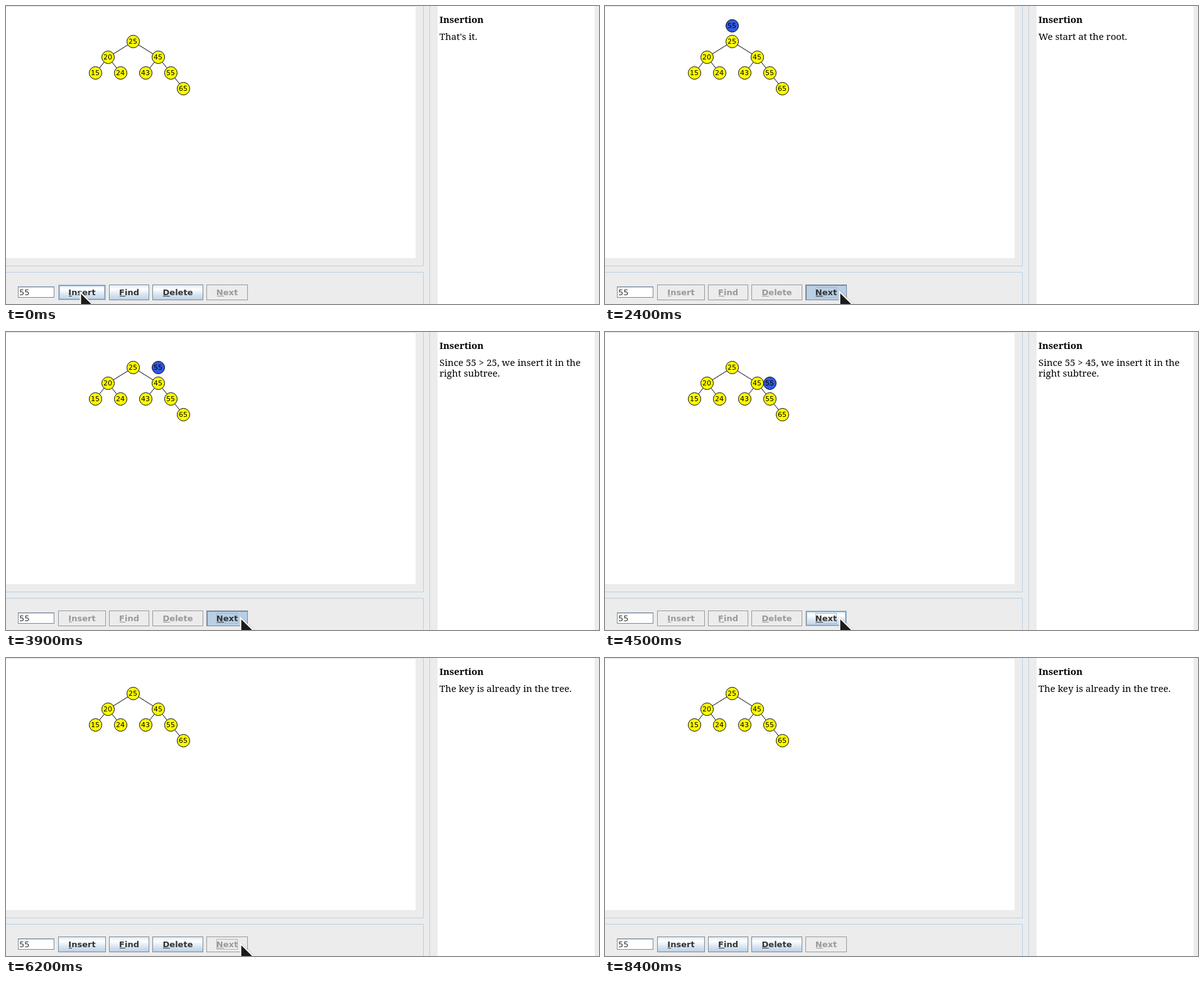
These frames come from a looping animation (944 by 474 pixels, 8600 ms). An HTML page:

```html
<!DOCTYPE html>
<html lang="en">
<head>
<meta charset="utf-8">
<title>Binary search tree insertion</title>
<style>
  html, body { margin: 0; width: 100%; height: 100%; overflow: hidden; background: #ececec; }
  svg { display: block; }
  .pane { fill: none; stroke: #b8cfe5; }
  .links { stroke: #000; }
  .node circle { fill: #ff0; stroke: #000; }
  .node text { font: 11px "DejaVu Sans", sans-serif; text-anchor: middle; }
  #key circle { fill: #3059e0; }
  .note { font: 15px "Noto Serif", serif; fill: #000; }
  .title { font-weight: bold; }
  .field { font: 13px "DejaVu Sans", sans-serif; fill: #333; }

  .button rect, .button path { fill: none; }
  .button text { font: bold 13px "DejaVu Sans", sans-serif; text-anchor: middle; fill: #333; }
  .button .face { fill: url(#ocean); }
  .button .frame { stroke: #7a8a99; }
  .button .mnemonic { fill: #333; }
  .hover .frame, .hover .inner { stroke: #b8cfe5; }
  .hover .edge, .pressed .shade { stroke: #7a8a99; }
  .pressed .face { fill: #b8cfe5; }
  .disabled .face { fill: none; }
  .disabled .frame { stroke: #999; }
  .disabled text, .disabled .mnemonic { fill: #999; }
  .focused .ring { stroke: #a3b8cc; }
</style>
</head>
<body>
<svg width="944" height="474" viewBox="0 0 944 474">
  <defs>
    <linearGradient id="ocean" x2="0" y2="1">
      <stop offset="0" stop-color="#dde8f3"/>
      <stop offset=".3" stop-color="#fff"/>
      <stop offset=".6" stop-color="#dde8f3"/>
      <stop offset="1" stop-color="#b8cfe5"/>
    </linearGradient>
    <clipPath id="sheet"><rect y="1" width="652" height="400"/></clipPath>
  </defs>

  <rect width="944" height="474" fill="#ececec"/>
  <rect width="652" height="1" fill="#dcdcdc"/>
  <rect y="1" width="652" height="400" fill="#fff"/>
  <rect x="687" width="250" height="474" fill="#fff"/>
  <path class="pane" d="M664.5 0V413.5H0M0 423.5H664.5V474M674.5 0V474"/>

  <g clip-path="url(#sheet)">
    <path id="links" class="links"/>
    <g id="tree"></g>
    <g id="key" class="node"></g>
  </g>

  <text class="note title" x="690" y="27">Insertion</text>
  <text id="line1" class="note" x="690" y="54"></text>
  <text id="line2" class="note" x="690" y="71"></text>

  <rect x="19.5" y="446.5" width="57" height="17" fill="#fff" stroke="#7a8a99"/>
  <path d="M20 447.5H76" stroke="#b8cfe5"/>
  <text class="field" x="21" y="460">55</text>
  <g id="buttons"></g>

  <path id="cursor" d="M2.5 5V44L11 36L18 51L24.5 48L17.5 33H31Z"
        fill="#1c1c1c" stroke="#fff" stroke-width="4" stroke-miterlimit="8" paint-order="stroke"
        style="filter: drop-shadow(1px 1px 1px #0004)"/>
</svg>

<script>
const LOOP = 8600, TICK = 100;
const $ = id => document.getElementById(id);

// key, x, y, index of the parent
const nodes = [
  [25, 202, 56], [20, 162, 81, 0], [45, 242, 81, 0], [15, 142, 106, 1],
  [24, 182, 106, 1], [43, 222, 106, 2], [55, 262, 106, 2], [65, 282, 131, 6]
];
const disc = key => `<circle cx=".5" cy=".5" r="10"/><text y="4">${key}</text>`;

$('tree').innerHTML = nodes.map(([key, x, y]) =>
  `<g class="node" transform="translate(${x} ${y})">${disc(key)}</g>`).join('');
$('links').setAttribute('d', nodes.slice(1).map(([, x, y, up]) =>
  `M${x + .5} ${y + .5}L${nodes[up][1] + .5} ${nodes[up][2] + .5}`).join(''));
$('key').innerHTML = disc(55);

// label, left, width, mnemonic width
const buttons = [['Insert', 83, 76, 5], ['Find', 164, 64, 9], ['Delete', 233, 81, 11], ['Next', 319, 66, 11]];
const box = (name, x, w, inset, h = 25) =>
  `<rect class="${name}" x="${x + inset + .5}" y="${443 + inset + .5}"
    width="${w - 2 * inset - 1}" height="${h - 2 * inset - 1}"/>`;

$('buttons').innerHTML = buttons.map(([label, x, w, under]) => `
  <g id="${label}" class="button">
    <rect class="face" x="${x}" y="443" width="${w}" height="25"/>
    ${box('frame', x, w, 0)}${box('edge', x, w, 1)}${box('inner', x, w, 2)}
    <path class="shade" d="M${x + 1.5} 467V444.5H${x + w - 1}"/>
    <rect class="ring" x="${x + 16.5}" y="447.5" width="${w - 33}" height="16"/>
    <text x="${x + w / 2}" y="460">${label}</text>
    <rect class="mnemonic" x="${x + 17}" y="461" width="${under}" height="1"/>
  </g>`).join('');

// Each track lists [start time, value...]
const tools = [[0, ''], [1000, 'disabled'], [5800, '']];
const states = {
  Insert: [[0, 'hover'], [900, 'pressed focused'], [1000, 'disabled focused'], [2400, 'disabled'], [5800, '']],
  Find: tools,
  Delete: tools,
  Next: [
    [0, 'disabled'], [1000, ''], [1700, 'hover'],
    [2400, 'pressed focused'], [2600, 'hover focused'],
    [3900, 'pressed focused'], [4100, 'hover focused'],
    [5600, 'pressed focused'], [5800, 'disabled focused'], [8400, 'disabled']
  ]
};
const compare = key => [`Since 55 > ${key}, we insert it in the`, 'right subtree.'];
const notes = [
  [0, "That's it.", ''], [1000, 'We start at the root.', ''],
  [2600, ...compare(25)], [4100, ...compare(45)],
  [5800, 'The key is already in the tree.', '']
];
const pointer = [
  [0, 117, 453], [1500, 190, 453], [1600, 310, 453], [1700, 372, 452],
  [7400, 363, 457], [7600, 245, 325], [7700, 88, 158],
  [7900, 80, 115], [8000, 62, 7], [8100, -99, -99]
];
// start, ticks, from x, y, to x, y
const moves = [
  [0, 1, -166, -1, -166, -1],
  [1000, 4, -166, -1, 202, 31],
  [2600, 5, 202, 31, 242, 56],
  [4100, 4, 242, 56, 262, 81],
  [5800, 4, 262, 81, 262, 421]
];

const at = (track, t) => track.findLast(step => step[0] <= t);
const place = (id, x, y) => $(id).setAttribute('transform', `translate(${x} ${y})`);

function draw(t) {
  for (const name in states) $(name).setAttribute('class', 'button ' + at(states[name], t)[1]);

  const [, first, second] = at(notes, t);
  $('line1').textContent = first;
  $('line2').textContent = second;

  const [start, ticks, x0, y0, x1, y1] = at(moves, t);
  const k = Math.min(1, Math.floor((t - start) / TICK) / ticks);
  place('key', Math.round(x0 + (x1 - x0) * k), Math.round(y0 + (y1 - y0) * k));

  const [, px, py] = at(pointer, t);
  place('cursor', px, py);
}

let origin;
function frame(now) {
  origin ??= now;
  draw((now - origin) % LOOP);
  requestAnimationFrame(frame);
}
draw(0);
requestAnimationFrame(frame);
</script>
</body>
</html>
```
